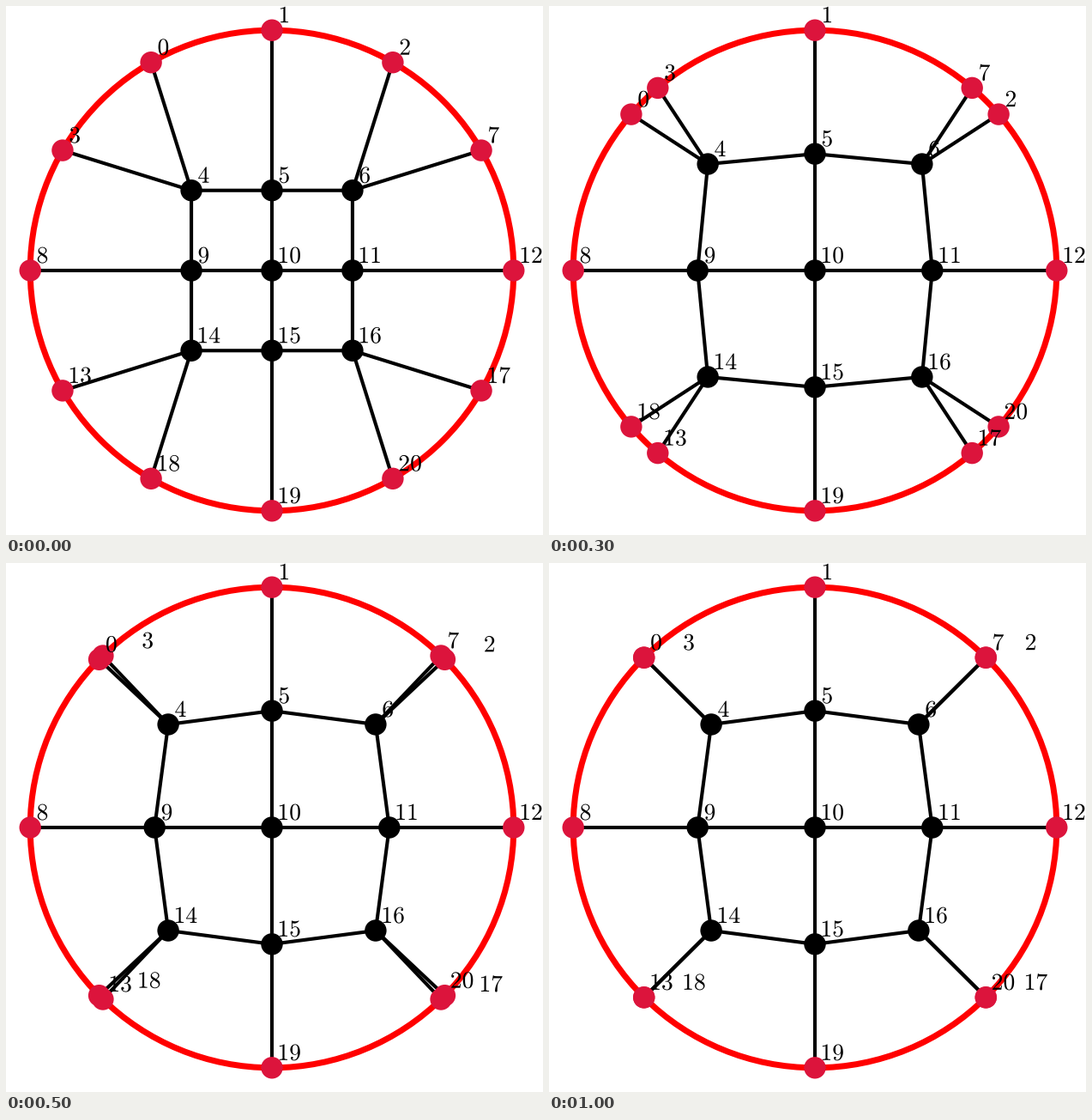
A matplotlib script that plays this animation: 626 by 616 pixels, repeating every 2600 ms.

```python
import matplotlib.pyplot as plt
import numpy as np
from itertools import combinations
from matplotlib.animation import FuncAnimation
from matplotlib.collections import LineCollection
from matplotlib.patches import Circle, Ellipse, PathPatch
from matplotlib.textpath import TextPath
from matplotlib.transforms import Affine2D

plt.rcParams["mathtext.fontset"] = "cm"

W, H, DPI = 626, 616, 64
PX = 72 / DPI                          # points per pixel
CX, CY, RX, RY = 310, 308, 281.8, 279.8
EM = 27.6                              # label font size in pixels

# Key poses: lean of the rim pairs off the diagonal in degrees, then the
# radius of the inner corners and of the inner side vertices
KEYS = [(-15, 1 / 3, 1 / 3), (-12.4, 0.4215, 0.4395),
        (-7.45, 0.4015, 0.511), (4.45, 0.443, 0.4855)]
DECAY = 0.375                          # share of the lean kept per later step
REST = 0.429                           # final radius of the inner corners

# A 5 x 5 grid without its corners, numbered row by row
CELLS = [(x, y) for y in range(2, -3, -1) for x in range(-2, 3)
         if abs(x * y) < 4]


def on_rim(cell):
    return max(map(abs, cell)) == 2


def joined(a, b):
    (ax, ay), (bx, by) = a, b
    return abs(ax - bx) + abs(ay - by) == 1 and not (on_rim(a) and on_rim(b))


EDGES = [(i, j) for i, j in combinations(range(len(CELLS)), 2)
         if joined(CELLS[i], CELLS[j])]


def pose(k):
    last = len(KEYS) - 1
    if k <= last:
        return KEYS[k]
    lean, _, side = KEYS[last]
    return lean * DECAY ** (k - last), REST, side


def place(cell, lean, corner, side):
    x, y = cell
    if not on_rim(cell):
        r = corner if x and y else side
        ux, uy = x * r, y * r
    elif x and y:
        a = np.radians(45 + lean)
        long, short = np.cos(a), np.sin(a)
        ux = np.sign(x) * (long if abs(x) == 2 else short)
        uy = np.sign(y) * (long if abs(y) == 2 else short)
    else:
        ux, uy = x / 2, y / 2
    return CX + RX * ux, CY - RY * uy


def label_shift(v, k):
    x, y = CELLS[v]
    second = on_rim((x, y)) and x * y and (abs(y) > abs(x)) == (x * y > 0)
    aside = 38 if second and k >= len(KEYS) else 0   # the pair has met
    return (7.4 if v < 10 else 6.4) + aside, -8.9


fig = plt.figure(figsize=(W / DPI, H / DPI), dpi=DPI, facecolor="white")
ax = fig.add_axes([0, 0, 1, 1])
ax.set(xlim=(0, W), ylim=(H, 0))
ax.axis("off")

ax.add_patch(Ellipse((CX, CY), 2 * RX, 2 * RY, fill=False, ec="#ff0000",
                     lw=7 * PX, zorder=1))
lines = LineCollection([], colors="black", linewidths=4.1 * PX, zorder=2)
lines.set_snap(False)
ax.add_collection(lines)

dots, labels = [], []
for v, cell in enumerate(CELLS):
    color = "#dc143c" if on_rim(cell) else "black"
    dots.append(ax.add_patch(Circle((0, 0), 12.7, fc=color, lw=0, zorder=3)))
    glyphs = TextPath((0, 0), rf"$\mathrm{{{v}}}$", size=EM)
    labels.append(ax.add_patch(PathPatch(glyphs, fc="black", lw=0, zorder=4)))


def draw(k):
    pos = [place(cell, *pose(k)) for cell in CELLS]
    lines.set_segments([[pos[a], pos[b]] for a, b in EDGES])
    for v, (x, y) in enumerate(pos):
        dots[v].center = (x, y)
        dx, dy = label_shift(v, k)
        move = Affine2D().scale(1, -1).translate(x + dx, y + dy)
        labels[v].set_transform(move + ax.transData)
    return [lines, *dots, *labels]


anim = FuncAnimation(fig, draw, frames=26, interval=100, repeat=True,
                     repeat_delay=0, init_func=lambda: draw(0))
plt.show()
```
